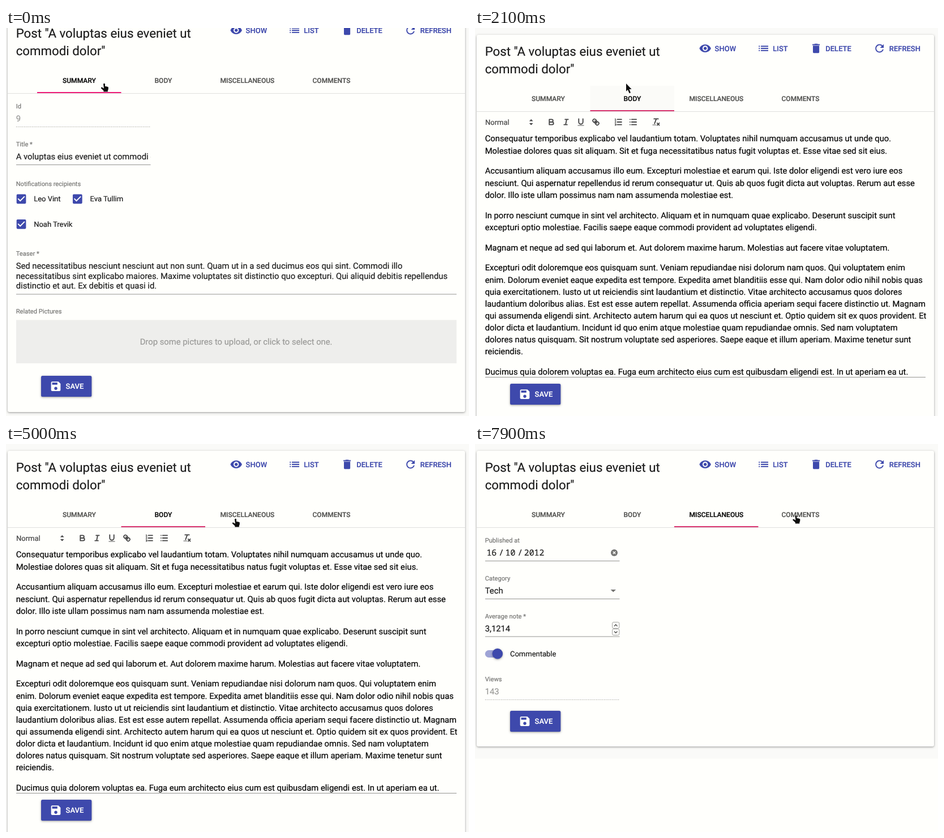
An HTML page that plays this animation: 818 by 685 pixels, repeating every 8 s.

```html
<!DOCTYPE html>
<html lang="en">
<head>
<meta charset="utf-8">
<title>Post edit form</title>
<style>
  html, body { margin: 0; width: 100%; height: 100%; overflow: hidden; background: #fffffc; }
  svg { display: block; width: 818px; height: 685px; font-family: Roboto, sans-serif; text-rendering: geometricPrecision; }
  .raised { filter: drop-shadow(0 1px 1px rgba(0,0,0,.18)) drop-shadow(0 1px 2px rgba(0,0,0,.24)); }
  .tool { fill: none; stroke: #444; stroke-width: 2; stroke-linecap: round; stroke-linejoin: round; }
  .tool .fill { fill: #444; stroke: none; }
  .tool .thin { stroke-width: 1; }
</style>
</head>
<body>
<svg id="stage" viewBox="0 0 818 685" xmlns="http://www.w3.org/2000/svg"></svg>
<script>
const ZOOM = 0.928, LEFT = 17.7, BODY_SIZE = 15.96;
const INK = '#1c1c1c', MUTED = '#757573', FAINT = '#9a9a98', BLUE = '#3e49ac', LINE = '#949492';

// Baselines sit on whole pixels; the hairline stroke gives the weight of hinted text
const text = (x, y, str, size = BODY_SIZE, fill = INK, extra = '') =>
  `<text x="${x}" y="${Math.round(y)}" font-size="${size * ZOOM}" fill="${fill}" stroke="${fill}" stroke-width=".2" ${extra}>${str}</text>`;
const label = (y, str) => text(LEFT, y, str, 12, MUTED);
const icon = (cx, cy, d, fill = BLUE) =>
  `<path transform="translate(${cx} ${cy}) scale(${ZOOM}) translate(-12 -12)" fill="${fill}" d="${d}"/>`;
const tool = (cx, body) =>
  `<g class="tool" transform="translate(${cx} 166) scale(${ZOOM}) translate(-9 -9)">${body}</g>`;
const path = (d, cls = '') => `<path class="${cls}" d="${d}"/>`;
const rule = (y, right = 255.5) => `<path d="M18 ${y}H${right}" stroke="${LINE}"/>`;
const dots = y => `<path d="M18 ${y}H255.5" stroke="#858583" stroke-dasharray=".95 1.85"/>`;

const ICONS = {
  show: 'M12 4.5C7 4.5 2.73 7.61 1 12c1.73 4.39 6 7.5 11 7.5s9.27-3.11 11-7.5c-1.73-4.39-6-7.5-11-7.5zM12 17c-2.76 0-5-2.24-5-5s2.24-5 5-5 5 2.24 5 5-2.24 5-5 5zm0-8c-1.66 0-3 1.34-3 3s1.34 3 3 3 3-1.34 3-3-1.34-3-3-3z',
  list: 'M3 13h2v-2H3zm0 4h2v-2H3zm0-8h2V7H3zm4 4h14v-2H7zm0 4h14v-2H7zM7 7v2h14V7z',
  trash: 'M6 19c0 1.1.9 2 2 2h8c1.1 0 2-.9 2-2V7H6zM19 4h-3.5l-1-1h-5l-1 1H5v2h14z',
  refresh: 'M17.65 6.35C16.2 4.9 14.21 4 12 4c-4.42 0-8 3.58-8 8s3.58 8 8 8c3.73 0 6.84-2.55 7.73-6h-2.08c-.82 2.33-3.04 4-5.65 4-3.31 0-6-2.69-6-6s2.69-6 6-6c1.66 0 3.14.69 4.22 1.78L13 11h7V4z',
  save: 'M17 3H5c-1.11 0-2 .9-2 2v14c0 1.1.89 2 2 2h14c1.1 0 2-.9 2-2V7zm-5 16c-1.66 0-3-1.34-3-3s1.34-3 3-3 3 1.34 3 3-1.34 3-3 3zm3-10H5V5h10z',
  check: 'M19 3H5c-1.11 0-2 .9-2 2v14c0 1.1.89 2 2 2h14c1.11 0 2-.9 2-2V5c0-1.1-.89-2-2-2zm-9 14l-5-5 1.41-1.41L10 14.17l7.59-7.59L19 8z'
};

const saveButton = top => `
  <rect class="raised" x="62" y="${top}" width="89.3" height="37" rx="2.5" fill="${BLUE}"/>
  ${icon(88, top + 18.6, ICONS.save, '#fffffc')}
  ${text(105.6, top + 23, 'SAVE', 14, '#fffffc', 'font-weight="500"')}`;

const checkbox = (cx, cy, name) => icon(cx, cy, ICONS.check) + text(cx + 22.2, cy + 4.6, name, 14);

const teaser = [
  'Sed necessitatibus nesciunt nesciunt aut non sunt. Quam ut in a sed ducimus eos qui sint. Commodi illo',
  'necessitatibus sint explicabo maiores. Maxime voluptates sit distinctio quo excepturi. Qui aliquid debitis repellendus',
  'distinctio et aut. Ex debitis et quasi id.'
];

const summary = `
  ${label(142.2, 'Id')}${text(LEFT, 165.2, '9', BODY_SIZE, FAINT)}${dots(174.5)}
  ${label(209.2, 'Title *')}
  <g clip-path="url(#field)">${text(LEFT, 232.2, 'A voluptas eius eveniet ut commodi dolor')}</g>${rule(241.5)}
  ${label(278.7, 'Notifications recipients')}
  ${checkbox(27, 301.8, 'Leo Vint')}${checkbox(126.3, 301.8, 'Eva Tullim')}${checkbox(27, 346.3, 'Noah Trevik')}
  ${label(402.2, 'Teaser *')}
  ${teaser.map((s, i) => text(LEFT, 425.2 + i * 17.64, s)).join('')}${rule(470, 796)}
  ${label(504.2, 'Related Pictures')}
  <rect x="18" y="515.5" width="778" height="76.5" fill="#eeeeec"/>
  ${text(406.6, 558.8, 'Drop some pictures to upload, or click to select one.', BODY_SIZE, FAINT, 'text-anchor="middle"')}
  ${saveButton(614)}`;

const paragraphs = [
  ['Consequatur temporibus explicabo vel laudantium totam. Voluptates nihil numquam accusamus ut unde quo.',
   'Molestiae dolores quas sit aliquam. Sit et fuga necessitatibus natus fugit voluptas et. Esse vitae sed sit eius.'],
  ['Accusantium aliquam accusamus illo eum. Excepturi molestiae et earum qui. Iste dolor eligendi est vero iure eos',
   'nesciunt. Qui aspernatur repellendus id rerum consequatur ut. Quis ab quos fugit dicta aut voluptas. Rerum aut esse',
   'dolor. Illo iste ullam possimus nam nam assumenda molestiae est.'],
  ['In porro nesciunt cumque in sint vel architecto. Aliquam et in numquam quae explicabo. Deserunt suscipit sunt',
   'excepturi optio molestiae. Facilis saepe eaque commodi provident ad voluptates eligendi.'],
  ['Magnam et neque ad sed qui laborum et. Aut dolorem maxime harum. Molestias aut facere vitae voluptatem.'],
  ['Excepturi odit doloremque eos quisquam sunt. Veniam repudiandae nisi dolorum nam quos. Qui voluptatem enim',
   'enim. Dolorum eveniet eaque expedita est tempore. Expedita amet blanditiis esse qui. Nam dolor odio nihil nobis quas',
   'quia exercitationem. Iusto ut ut reiciendis sint laudantium et distinctio. Vitae architecto accusamus quos dolores',
   'laudantium doloribus alias. Est est esse autem repellat. Assumenda officia aperiam sequi facere distinctio ut. Magnam',
   'qui assumenda eligendi sint. Architecto autem harum qui ea quos ut nesciunt et. Optio quidem sit ex quos provident. Et',
   'dolor dicta et laudantium. Incidunt id quo enim atque molestiae quam repudiandae omnis. Sed nam voluptatem',
   'dolores natus quisquam. Sit nostrum voluptate sed asperiores. Saepe eaque et illum aperiam. Maxime tenetur sunt',
   'reiciendis.'],
  ['Ducimus quia dolorem voluptas ea. Fuga eum architecto eius cum est quibusdam eligendi est. In ut aperiam ea ut.']
];
let lineY = 200.45;
const bodyText = paragraphs.map(lines => {
  const out = lines.map((s, i) => text(LEFT, lineY + i * 21.08, s, BODY_SIZE, '#040404')).join('');
  lineY += lines.length * 21.08 + 14.85;
  return out;
}).join('');

const toolbar = text(18, 170.7, 'Normal', 14, '#444')
  + '<path d="M95.8 164.6l3.4-3.6 3.4 3.6zM95.8 168l3.4 3.6 3.4-3.6z" fill="#444"/>'
  + tool(135, path('M5 4H9.5a2.5 2.5 0 0 1 0 5H5zM5 9h5.5a2.5 2.5 0 0 1 0 5H5z'))
  + tool(161, path('M7 4h6M5 14h6M8 14L10 4'))
  + tool(187, path('M5 3V9a4 4 0 0 0 8 0V3') + path('M3 15h12v1H3z', 'fill'))
  + tool(213.5, path('M7 7l4 4M8.9 4.58a3.48 3.48 0 0 1 .36 4.68A3.48 3.48 0 0 1 4.58 8.9C3.19 7.5 2.04 6.4 4.22 4.22S7.5 3.19 8.9 4.58zM13.42 9.1a3.48 3.48 0 0 0-4.68-.36 3.48 3.48 0 0 0 .36 4.68c1.39 1.39 2.5 2.54 4.68.36S14.82 10.5 13.42 9.1z'))
  + tool(253.3, path('M7 4h8M7 9h8M7 14h8') + path('M2.5 5.5h2M3.5 5.5v-3l-1 .5M2.5 7.6h2l-2 2.9h2M2.5 12.5h2v3h-2M3 14h1.5', 'thin'))
  + tool(279.5, path('M6 4h9M6 9h9M6 14h9M3 4h0M3 9h0M3 14h0'))
  + tool(320, path('M5 3h8M6 12L9.35 3M11 11l4 4M15 11l-4 4') + path('M2 14h7v1H2z', 'fill'));

const body = toolbar + bodyText + rule(616.5, 796) + saveButton(628);

const mono = (x, str) => text(x, 197, str, 16, INK, 'font-family="Noto Sans Mono, monospace"');
const spin = (y, d) => `
  <rect x="242.5" y="${y}" width="12.5" height="11" rx="2.5" fill="#f8f8f6" stroke="#aaaaa8"/>
  <path d="${d}" fill="none" stroke="#333" stroke-width="1.2"/>`;

const misc = `
  ${label(174, 'Published at')}
  ${mono(20.4, '16')}${mono(41.9, '/')}${mono(53.6, '10')}${mono(75.2, '/')}${mono(86.8, '2012')}
  <circle cx="246" cy="192" r="6" fill="#747472"/>
  <path d="M243.7 189.7l4.6 4.6M248.3 189.7l-4.6 4.6" stroke="#fffffc" stroke-width="1.4"/>${rule(206.5)}
  ${label(240.9, 'Category')}${text(LEFT, 263.8, 'Tech')}
  <path d="M239.6 257l4.7 4.6 4.7-4.6z" fill="#747472"/>${rule(273.5)}
  ${label(307.9, 'Average note *')}${text(LEFT, 330.5, '3,1214')}
  ${spin(314.5, 'M246 321.6l2.7-2.7 2.7 2.7')}${spin(326.5, 'M246 330.8l2.7 2.7 2.7-2.7')}${rule(340)}
  <rect x="17.8" y="364" width="31" height="13" rx="6.5" fill="#9fa4d6"/>
  <circle class="raised" cx="39.8" cy="370.3" r="9.2" fill="${BLUE}"/>
  ${text(62, 375, 'Commentable', 14)}
  ${label(418.9, 'Views')}${text(LEFT, 442, '143', BODY_SIZE, FAINT)}${dots(451.5)}
  ${saveButton(471)}`;

const TAB_X = 55, TAB_W = 148.5;
const tabLeft = i => TAB_X + i * TAB_W;
const action = (cx, x, name, d) => icon(cx, 36, d) + text(x, 40.8, name, 14, BLUE, 'font-weight="500"');

const header = `
  ${text(LEFT, 49, 'Post "A voluptas eius eveniet ut', 24)}${text(LEFT, 80, 'commodi dolor"', 24)}
  ${action(406.7, 423.6, 'SHOW', ICONS.show)}${action(509.7, 526.3, 'LIST', ICONS.list)}
  ${action(602.6, 619.3, 'DELETE', ICONS.trash)}${action(714.7, 731.8, 'REFRESH', ICONS.refresh)}
  <path d="M3 147.5H811" stroke="#e0e0de"/>
  <g clip-path="url(#tab)"><circle id="ripple"/></g>
  ${['SUMMARY', 'BODY', 'MISCELLANEOUS', 'COMMENTS'].map((s, i) =>
    text(tabLeft(i) + TAB_W / 2 + 0.2, 129.3, s, 13, 'currentColor', 'class="tab" font-weight="500" text-anchor="middle"')).join('')}
  <rect id="bar" y="145" width="${TAB_W}" height="2"/>`;

const $ = id => document.getElementById(id);
$('stage').innerHTML = `
  <clipPath id="field"><rect x="17" y="215" width="238.5" height="25"/></clipPath>
  <clipPath id="tab"><rect id="tabBox" y="102" width="${TAB_W}" height="45"/></clipPath>
  <rect id="page" width="818" fill="#fafaf8"/>
  <rect id="card" class="raised" x="3" width="808" rx="3" fill="#fffffc"/>
  ${[summary, body, misc].map(p => `<g class="panel">${p}</g>`).join('')}
  <g id="header">${header}</g>
  <g id="cursor" stroke="#fffffc" stroke-width="1" paint-order="stroke" fill="#0c0c0c">
    <path id="arrow" d="M0 0V13.7L3 10.9 5.6 17.2 8 16.2 5.4 10.1H9.6Z"/>
    <path id="hand" d="M-1.5 1.2a1.5 1.5 0 0 1 3 0v4l1.3-.5 1 .8 1.3-.2.8.8 1.4.2v3.7l-1 2.4v2.2h-7.4v-2l-4.4-4.2v-1.6h1.8l3.2 1.9z"/>
  </g>`;
const panels = document.querySelectorAll('.panel'), tabs = document.querySelectorAll('.tab');

// Standard material curve, cubic-bezier(.4, 0, .2, 1)
function ease(p) {
  if (p <= 0) return 0;
  if (p >= 1) return 1;
  let lo = 0, hi = 1;
  for (let i = 0; i < 20; i++) {
    const s = (lo + hi) / 2, r = 1 - s;
    if (1.2 * r * r * s + 0.6 * r * s * s + s * s * s < p) lo = s; else hi = s;
  }
  return lo * lo * (3 - 2 * lo);
}
const span = (t, from, to) => ease((t - from) / (to - from));
const smooth = p => p * p * (3 - 2 * p);

const VIEWS = [
  { scroll: -32, bottom: 678, page: 685, pink: '#ee1a78' },
  { scroll: 0, bottom: 760, page: 685, pink: '#d9346f' },
  { scroll: 0, bottom: 534, page: 555.5, pink: '#d9346f' }
];
const CLICKS = [
  { tab: 1, down: 1543, up: 1700, hold: 2100, end: 2400, x: 264, y: 128, r: 93 },
  { tab: 2, down: 5072, up: 5242, hold: 5700, end: 5700, x: 405, y: 127, r: 99.5 }
];
const MOVES = [
  { from: 100, to: 1100, x: 267, y: 98 },
  { from: 2300, to: 3100, x: 405.5, y: 132 },
  { from: 6200, to: 7000, x: 567, y: 126 }
];

const set = (id, attrs) => { for (const k in attrs) $(id).setAttribute(k, attrs[k]); };

function draw(t) {
  const current = CLICKS.filter(c => t >= c.up).length, view = VIEWS[current];
  panels.forEach((p, i) => p.style.display = i === current ? '' : 'none');
  tabs.forEach((el, i) => el.style.color = i === current ? '#080808' : '#525250');
  set('page', { height: view.page });
  set('card', { y: 12 + view.scroll, height: view.bottom - 12 - view.scroll });
  set('header', { transform: `translate(0 ${view.scroll})` });

  const slide = CLICKS.reduce((sum, c) => sum + span(t, c.up, c.up + 300), 0);
  set('bar', { x: tabLeft(slide), fill: view.pink });

  const click = CLICKS.find(c => t >= c.down && t < c.end);
  $('ripple').style.display = click ? '' : 'none';
  if (click) {
    const fade = span(Math.min(t, click.hold), click.up, click.up + 550);
    set('tabBox', { x: tabLeft(click.tab) });
    set('ripple', {
      cx: click.x, cy: click.y, r: click.r * span(t, click.down, click.down + 550),
      'fill-opacity': 0.31 * (1 - fade)
    });
  }

  let x = 173.5, y = 98;
  for (const m of MOVES) {
    const p = smooth(Math.min(1, Math.max(0, (t - m.from) / (m.to - m.from))));
    x += (m.x - x) * p;
    y += (m.y - y) * p;
  }
  const overTabs = y > 102 + view.scroll;
  $('hand').style.display = overTabs ? '' : 'none';
  $('arrow').style.display = overTabs ? 'none' : '';
  set('cursor', { transform: `translate(${x} ${y})` });
}

const LOOP = 8000, STEP = 100, start = performance.now();
function tick() {
  const t = (performance.now() - start) % LOOP;
  draw(Math.floor(t / STEP) * STEP);
  requestAnimationFrame(tick);
}
tick();
</script>
</body>
</html>
```
